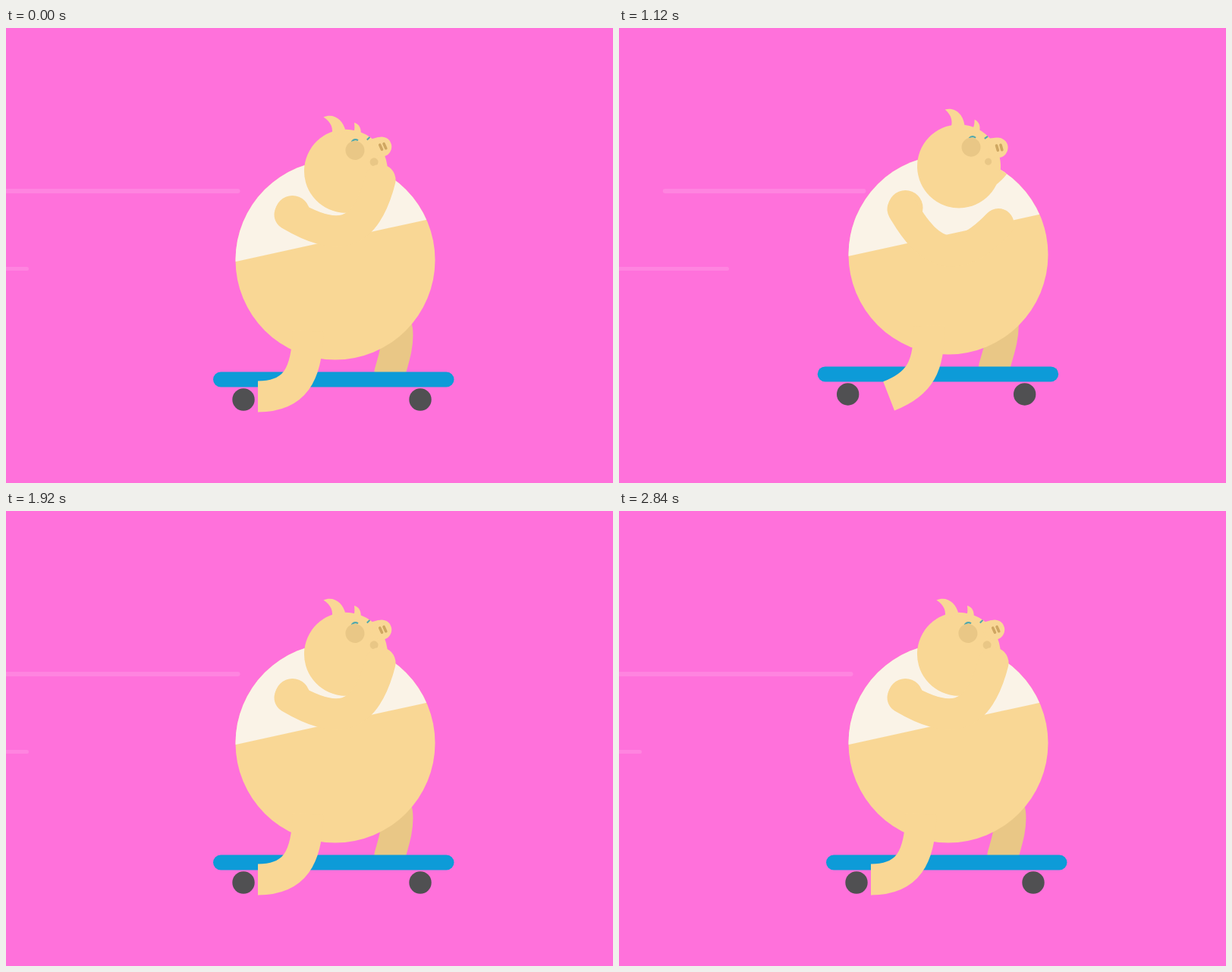
Write an HTML page that moves like this. It is 800 by 600 pixels and loops after 2880 ms.

```html
<!DOCTYPE html>
<html lang="en">
<head>
<meta charset="utf-8">
<title>Skating pig</title>
<style>
  html, body { margin: 0; width: 100%; height: 100%; overflow: hidden; background: #ff71db; }
  svg { display: block; width: 800px; height: 600px; }
  .skin { fill: #f9d795; }
  .dark { fill: #e9c786; }
  .streak { fill: #ff84e0; }
  .limb { fill: none; stroke: #f9d795; stroke-width: 41; }
  .far { stroke: #e9c786; }
  .arm { stroke-linecap: round; }
  .nostril { stroke: #cfa762; stroke-width: 3.6; stroke-linecap: round; }
  .eye { fill: none; stroke: #4fa8ad; stroke-width: 2; }
</style>
</head>
<body>
<svg viewBox="0 0 800 600">
  <defs>
    <clipPath id="belly"><circle cx="434" cy="306" r="131.5"/></clipPath>
  </defs>
  <rect id="streak1" class="streak" y="212" height="6" rx="3"/>
  <rect id="streak2" class="streak" y="315" width="200" height="5" rx="2.5"/>
  <g id="bob">
    <path id="farLeg" class="limb far"/>
    <path id="farArm" class="limb far arm" d="M0 0C18 56 66 52 103 0"/>
    <g id="board">
      <rect y="453.5" width="317.5" height="20" rx="10" fill="#0d9bd8"/>
      <g fill="#505052">
        <circle cx="40" cy="490" r="14.7"/>
        <circle cx="273" cy="490" r="14.7"/>
      </g>
    </g>
    <circle class="skin" cx="434" cy="306" r="131.5"/>
    <g clip-path="url(#belly)">
      <path d="M298 309L570 249.5V160H298Z" fill="#faf3e7"/>
      <circle class="skin" cx="457" cy="160" r="67"/>
    </g>
    <g id="head">
      <g transform="translate(0 19.4)">
        <g class="skin">
          <circle cx="448" cy="170.6" r="55"/>
          <path d="M439 94C453 92 463 104 462 120L442 122C448 112 447 103 439 94Z"/>
          <path d="M476 112C482 116 483 122 480 130L469 127C474 123 475 118 476 112Z"/>
          <path d="M484 139H502V165H490Z"/>
          <circle cx="502" cy="152.5" r="13.2"/>
        </g>
        <path class="eye" d="M465.5 136Q470 131.500 474.500 136M486 138.500L490.500 136"/>
        <circle class="dark" cx="467" cy="147.500" r="12.500"/>
        <path class="nostril" d="M500.500 149.500L501.500 156M506 149.500L507 156"/>
        <circle id="mouth" class="dark" cx="487" cy="169.200"/>
      </g>
    </g>
    <path id="leg" class="limb"/>
    <circle class="skin" cx="377.500" cy="244" r="23"/>
    <path id="arm" class="limb arm" d="M0 0C44 55 81 66 127.500 0"/>
  </g>
</svg>
<script>
const STEP = 40, LOOP = 2880, HALF = 12;
const el = id => document.getElementById(id);
const set = (id, attrs) => {
  for (const name in attrs) el(id).setAttribute(name, attrs[name]);
};
const mix = (a, b, t) => a + (b - a) * t;
const mixPoint = (a, b, t) => [mix(a[0], b[0], t), mix(a[1], b[1], t)];

// cubic-bezier(.65, 0, .35, 1)
function ease(x) {
  let lo = 0, hi = 1;
  for (let i = 0; i < 24; i++) {
    const s = (lo + hi) / 2, r = 1 - s;
    if (3 * r * r * s * 0.65 + 3 * r * s * s * 0.35 + s ** 3 < x) lo = s; else hi = s;
  }
  return 3 * (1 - lo) * lo * lo + lo ** 3;
}

// Front leg: crouched and stretched control points, hip to foot
const CROUCHED = [[398, 400], [397, 458], [380, 486], [332, 486]];
const STRETCHED = [[469, 400], [482, 425], [490.5, 423], [490.5, 529.2]];

function draw(time) {
  const tick = Math.floor(time % LOOP / STEP);
  // The last descent skips one step so the loop closes on the crouch.
  const k = (tick + (tick >= 65 ? 1 : 0)) % (2 * HALF);
  const p = (k <= HALF ? k : 2 * HALF - k) / HALF;
  const e = ease(p);
  const settle = (1 - p) ** 2;

  set('bob', { transform: `translate(0 ${-21.2 * p})` });

  const left = 200 - 480 * (1 - p) ** 3;
  set('streak1', { x: left, width: 308.5 + 113 * e - left });
  set('streak2', { x: mix(-170, 175, p) });

  const boardX = mix(273, 197, e);
  set('board', { transform: `translate(${boardX} 0)` });

  set('arm', { transform: `translate(374 246) rotate(${-21 + 200 * e})` });
  set('farArm', { transform: `translate(491 231) rotate(${103.8 - 142 * e})` });

  const [hip, c1, c2, foot] = CROUCHED.map((pt, i) => mixPoint(pt, STRETCHED[i], e));
  set('leg', { d: `M${hip}C${c1} ${c2} ${foot}` });

  const footX = boardX + 233;
  const knee = mixPoint([533, 376], [465, 396], e);
  set('farLeg', { d: `M${footX - 1} 463L${footX} 454C${footX + mix(8, 4, e)} 425 ${knee} 480 360` });

  set('head', { transform: `rotate(${-15.8 * settle} 443.5 189.5)` });
  set('mouth', { r: 5.5 - 2.7 * p });
}

const start = performance.now();
function frame() {
  draw(performance.now() - start);
  requestAnimationFrame(frame);
}
frame();
</script>
</body>
</html>
```
